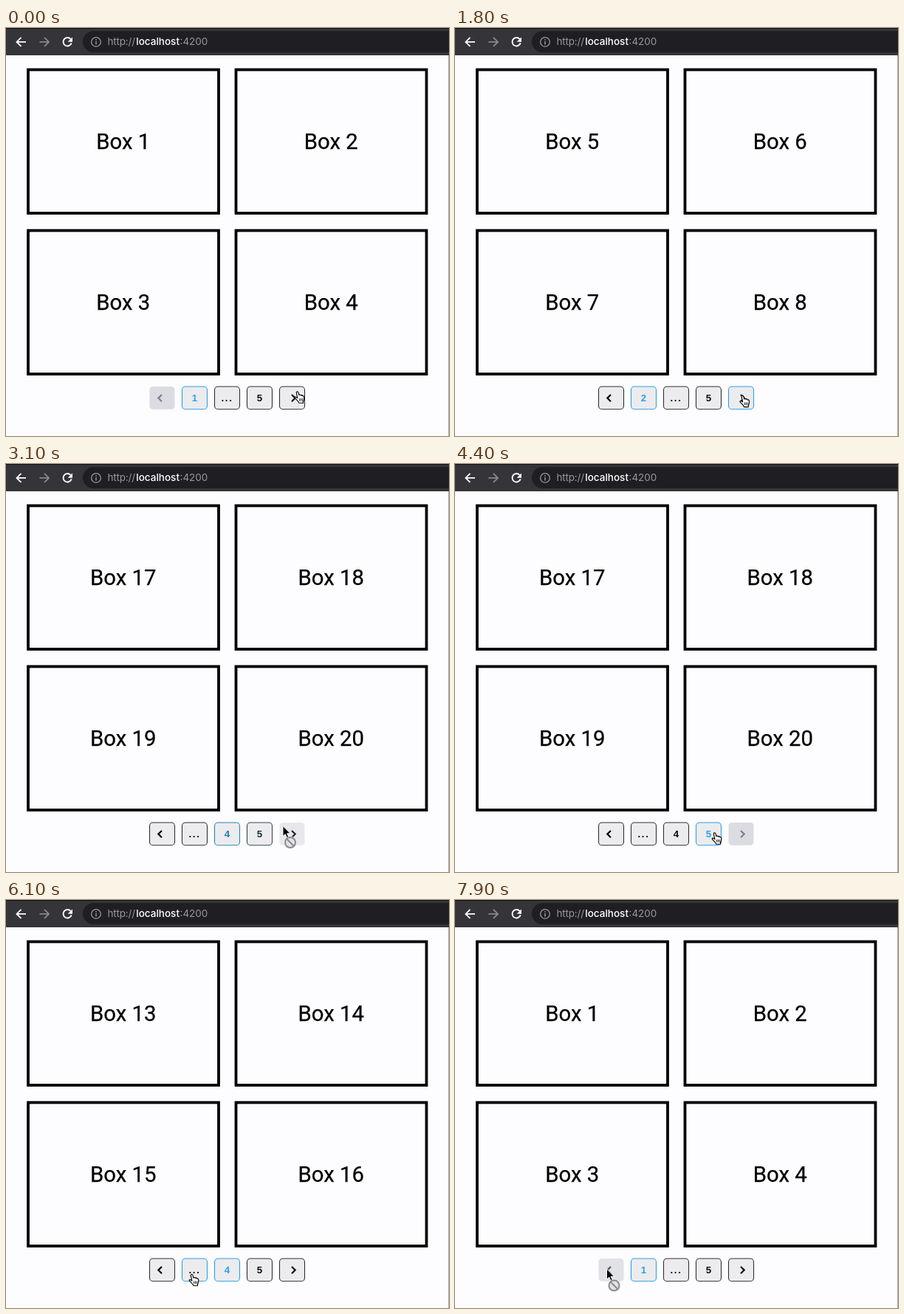
An HTML page for the animation above (8 s loop, 600 by 553 pixels).

```html
<!DOCTYPE html>
<html lang="en">
<head>
<meta charset="utf-8">
<title>Pagination</title>
<style>
  html, body { margin: 0; width: 100%; height: 100%; overflow: hidden; background: #fdfcfe; }
  svg { display: block; width: 100%; height: 100%; }
  .url { font: 13.5px Inter, sans-serif; fill: #98989c; }
  .host { fill: #fff; font-weight: 500; }
  .box { font: 29.3px Roboto, sans-serif; text-anchor: middle; stroke: #000; stroke-width: .25px; }
  .num { font: bold 13.3px "Liberation Sans", Arial, sans-serif; text-anchor: middle; }
</style>
</head>
<body>
<svg id="stage" viewBox="0 0 600 553">
  <rect width="600" height="553" fill="#fdfcfe"/>
  <rect x="599" y="37" width="1" height="516" fill="#a5a4a8"/>
  <rect width="600" height="37" fill="#353438"/>
  <rect width="600" height="1" fill="#111013"/>
  <rect x="104" y="4" width="540" height="29" rx="14.5" fill="#1f1e22"/>
  <g fill="none" stroke-width="1.9" transform="translate(0 .4)">
    <path stroke="#fff" d="M27 18.5H14.5M20.5 12.5l-6 6 6 6"/>
    <path stroke="#87868a" d="M45.5 18.5H58M52 12.5l6 6-6 6"/>
    <path stroke="#fff" d="M87.6 14.6A5.7 5.7 0 1 0 88.7 20"/>
    <path fill="#fff" stroke="none" d="M90 12v6.3h-6.3z"/>
    <circle cx="122" cy="18.5" r="6.3" stroke="#98989c" stroke-width="1.3"/>
    <path stroke="#98989c" stroke-width="1.5" d="M122 17.6v4.4M122 14.8v1.5"/>
  </g>
  <text class="url" y="23.4"><tspan x="137.5" letter-spacing="-.2">http://</tspan><tspan class="host" x="176.3">localhost</tspan><tspan x="235.5">:4200</tspan></text>
  <g id="boxes"></g>
  <g id="pager"></g>
  <g id="hand" stroke="#000" stroke-linejoin="round">
    <path fill="#fff" stroke-width="1.2" d="M.4 9L-1.2 1.6Q-1.4 -.1 0 -.2Q1.2 -.2 1.6 1.2L2.6 5Q2.8 4 4 4.2Q5 4.4 5.2 5.4Q5.6 4.6 6.6 4.9Q7.5 5.2 7.6 6.1Q8.4 5.6 9.1 6.2Q9.8 6.8 9.8 8L9.4 11.6L8.4 14V16H2.4Q1.8 13.8 -.4 12L-3.2 9Q-3.8 7.8 -2.8 7.5Q-1.6 7.4 .4 9Z"/>
    <path fill="none" stroke-width=".9" d="M3.3 9.5v3.8M5.3 9.5v3.8M7.3 9.5v3.8"/>
  </g>
  <g id="arrow">
    <path stroke="#fff" d="M0 0V14.2L3.3 11.2L5.6 16.4L8 15.4L5.7 10.3H10.2Z"/>
    <g id="badge" fill="none">
      <circle cx="10" cy="22.5" r="8.6" fill="#f4f3f5"/>
      <circle cx="10" cy="22.5" r="7" fill="#e2e1e4" stroke="#8b8a8d" stroke-width="2"/>
      <path stroke="#8b8a8d" stroke-width="2" d="M5 17.5l10 10"/>
    </g>
  </g>
</svg>
<script>
const LOOP = 8000, TICK = 100, GLIDE = 450, FADE = 240, LAST = 5;
const NS = 'http://www.w3.org/2000/svg';
const $ = id => document.getElementById(id);

// Each click turns one page: up to the last, then back to the first
const clicks = [650, 2050, 2500, 3050, 5000, 6750, 7250, 7780];

// The pointer rests, then glides to the next stop
const home = { x: 394.5, y: 493 };
const stops = [
  { at: 0, x: 399.5, y: 504 },
  { at: 1600, x: 375, y: 490.5 },
  { at: 3500, x: 351.5, y: 500 },
  { at: 4400, x: 300, y: 503 },
  { at: 5050, x: 283, y: 531 },
  { at: 5550, x: 251.5, y: 507.5 },
  { at: 6200, x: 205.5, y: 500 }
];

function add(parent, tag, attrs) {
  const el = document.createElementNS(NS, tag);
  for (const k in attrs) el.setAttribute(k, attrs[k]);
  return parent.appendChild(el);
}

const boxes = [0, 1, 2, 3].map(i => {
  const x = 28 + (i % 2) * 281.5, y = 54.5 + (i >> 1) * 218;
  add($('boxes'), 'rect', { x: x + 2, y: y + 2, width: 258, height: 194.5, fill: 'none', stroke: '#000', 'stroke-width': 3.8 });
  return add($('boxes'), 'text', { class: 'box', x: x + 130.8, y: y + 109.5 });
});

const slotX = i => 194.5 + i * 44;
const slots = [0, 1, 2, 3, 4].map(i => {
  const x = slotX(i), cx = x + 17;
  const rect = add($('pager'), 'rect', { x, y: 486, width: 34, height: 30.7, rx: 4.5, 'stroke-width': 1.1 });
  const arm = i ? 4.7 : -4.7;
  const mark = i % 4
    ? add($('pager'), 'text', { class: 'num', x: cx, y: 506 })
    : add($('pager'), 'path', { d: `M${cx - .5} 497l${arm} 4.6l${-arm} 4.6`, fill: 'none', 'stroke-width': 2.2 });
  return { rect, mark };
});

const mix = (a, b, k) => `rgb(${a.map((v, i) => Math.round(v + (b[i] - v) * k))})`;
const BLACK = [10, 10, 12], BLUE = [42, 162, 228], EDGE = [48, 48, 52];
const FILL = [236, 235, 238], OFF = [219, 220, 225], GREY = [128, 129, 135];

function pageAt(t) {
  const done = clicks.filter(at => t >= at).length;
  return LAST - Math.abs(LAST - 1 - done);
}

function tipAt(t) {
  let { x, y } = home;
  for (const stop of stops) {
    const u = Math.max(0, Math.min(1, (t - stop.at) / GLIDE));
    const k = u * u * (3 - 2 * u);
    x += (stop.x - x) * k;
    y += (stop.y - y) * k;
  }
  return [x, y];
}

const slotAt = ([x, y]) =>
  slots.findIndex((s, i) => x >= slotX(i) && x <= slotX(i) + 34.5 && y >= 486 && y <= 517);

const activeSlot = page => Math.max(1, page - 2);
const isActive = (i, t) => i === activeSlot(pageAt(t));
const isOff = (i, t) => pageAt(t) === (i === 0 ? 1 : i === 4 ? LAST : 0);
const isHover = (i, t) => t > 0 && slotAt(tipAt(t)) === i;

// Share of the recent past in which a state held: a linear fade
function fade(state, i, t) {
  const steps = 8;
  let n = 0;
  for (let k = 0; k < steps; k++) n += state(i, t - k * FADE / steps);
  return n / steps;
}

function draw(t) {
  const page = pageAt(t);
  boxes.forEach((el, i) => { el.textContent = 'Box ' + (page * 4 - 3 + i); });

  const labels = page <= 3 ? [page, '...', LAST] : ['...', 4, LAST];
  slots.forEach(({ rect, mark }, i) => {
    const off = fade(isOff, i, t), active = fade(isActive, i, t);
    const lit = Math.max(active, fade(isHover, i, t));
    rect.setAttribute('fill', mix(FILL, OFF, off));
    rect.setAttribute('stroke', isOff(i, t) ? 'none' : mix(EDGE, BLUE, lit));
    if (i % 4) {
      const label = labels[i - 1];
      mark.textContent = label;
      mark.setAttribute('letter-spacing', label === '...' ? 1.6 : 0);
      mark.setAttribute('fill', mix(BLACK, BLUE, active));
    } else {
      mark.setAttribute('stroke', mix(BLACK, GREY, off));
    }
  });

  const tip = tipAt(t), over = slotAt(tip);
  const blocked = over >= 0 && isOff(over, t), hand = over >= 0 && !blocked;
  const show = (id, on) => $(id).setAttribute('visibility', on ? 'visible' : 'hidden');
  $('hand').setAttribute('transform', `translate(${tip}) scale(.95)`);
  $('arrow').setAttribute('transform', `translate(${tip})`);
  show('hand', hand);
  show('arrow', !hand);
  show('badge', blocked);
}

const start = performance.now();
function loop() {
  const t = (performance.now() - start) % LOOP;
  draw(Math.floor(t / TICK) * TICK);
  requestAnimationFrame(loop);
}
loop();
</script>
</body>
</html>
```
